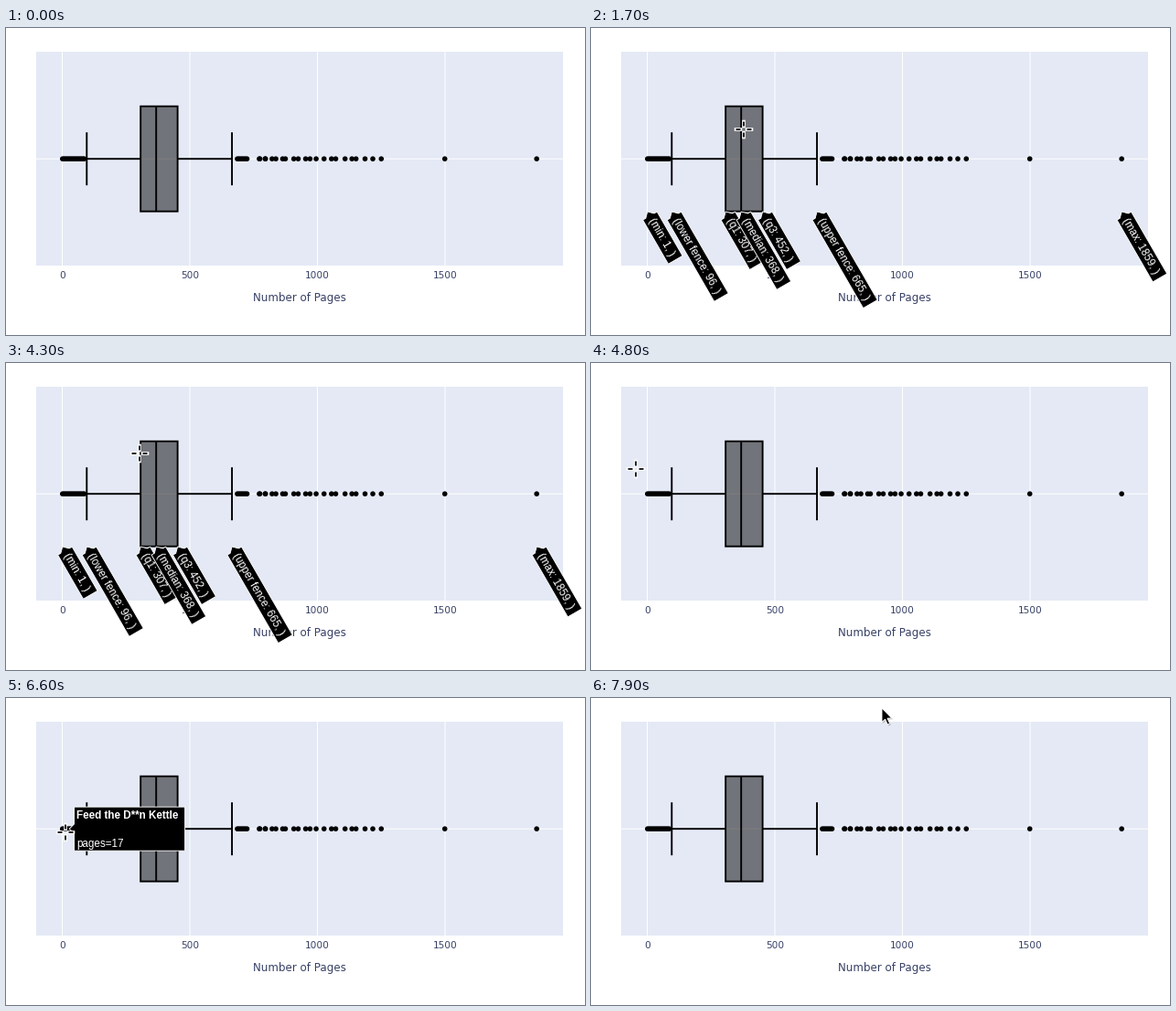
A matplotlib script that plays this animation: 633x336 px, repeating every 8 s.

```python
import numpy as np
import matplotlib.pyplot as plt
from matplotlib.animation import FuncAnimation
from matplotlib.patches import Circle, Polygon, Rectangle

W, H, DPI = 633, 336, 96
PT = 72 / DPI  # points per pixel
INK = "#384167"
MID = 143.2

fig = plt.figure(figsize=(W / DPI, H / DPI), dpi=DPI, facecolor="white")
ax = fig.add_axes([0, 0, 1, 1])
ax.set(xlim=(0, W), ylim=(H, 0))
ax.axis("off")


def px(pages):
    return 61.5 + 0.279 * pages


def line(xs, ys, color, width, z):
    return ax.plot(xs, ys, color=color, lw=width * PT, zorder=z, snap=False,
                   solid_capstyle="butt")[0]


def text(x, y, s, size, color, family="DejaVu Sans", **kw):
    return ax.text(x, y, s, size=size * PT, color=color, family=family,
                   va="baseline", **kw)


# Plot area, grid and axis
ax.add_patch(Rectangle((33, 26), 576, 234, fc="#e4e9f5", lw=0, zorder=0))
for tick in range(0, 2000, 500):
    line([px(tick)] * 2, [26, 260], "white", 1, 1)
    text(px(tick), 274, str(tick), 10.5, INK, ha="center")
line([33, 609], [MID, MID], "white", 1, 1)
text(321, 299, "Number of Pages", 11.85, INK, ha="center")

# Box plot
LOW, Q1, MEDIAN, Q3, HIGH, MAX = 96, 307, 368, 452, 665, 1859
BOX = MID + np.array([-57.5, 57.5])
ax.add_patch(Rectangle((px(Q1), BOX[0]), px(Q3) - px(Q1), np.ptp(BOX),
                       fc=(0, 0, 0, 0.5), ec="black", lw=1.9 * PT,
                       snap=False, zorder=2))
line([px(MEDIAN)] * 2, BOX, "black", 1.9, 3)
for fence, edge in ((LOW, Q1), (HIGH, Q3)):
    line([px(fence), px(edge)], [MID, MID], "black", 1.9, 3)
    line([px(fence)] * 2, MID + np.array([-29, 29]), "black", 1.9, 3)

# Outliers: dense next to the fences, thinning out to the right
rng = np.random.default_rng(4)
tail = 765 + 478 * np.linspace(0, 1, 22) ** 1.3 + rng.uniform(-8, 8, 22)
for pages in [*np.linspace(1, 86, 15), *np.linspace(686, 724, 7), *tail,
              1499, MAX]:
    ax.add_patch(Circle((px(pages), MID), 2.8, fc="black", lw=0, zorder=4))


def callout(x, y, rows, height, z, angle=0):
    """Black hover label with its tip at (x, y); rows are (text, dy, weight)."""
    a = np.radians(angle)
    turn = np.array([[np.cos(a), -np.sin(a)], [np.sin(a), np.cos(a)]])

    def place(u, v):
        return turn @ (u, v) + (x, y)

    texts, width = [], 0
    for s, dy, weight in rows:
        t = text(*place(8, dy), s, 11.6, "white", "Liberation Sans",
                 weight=weight, zorder=z + 0.5, rotation_mode="anchor")
        width = max(width, t.get_window_extent().width)
        t.set_rotation(-angle)
        texts.append(t)
    tip, h, end = 5.3, height / 2, width + 15
    shape = [(0, 0), (tip, tip), (tip, h), (end, h),
             (end, -h), (tip, -h), (tip, -tip)]
    body = Polygon([place(*p) for p in shape], fc="black", ec="white",
                   lw=0.9 * PT, snap=False, zorder=z)
    ax.add_patch(body)
    return [body] + texts


def tooltip(title, pages):
    rows = [(title, -11, "bold"), (f"pages={pages}", 20, "normal")]
    return callout(px(pages) + 3, MID, rows, 48, 30)


stats = {"min": 1, "lower fence": LOW, "q1": Q1, "median": MEDIAN,
         "q3": Q3, "upper fence": HIGH, "max": MAX}
summary = []
for i, (name, value) in enumerate(stats.items()):
    row = (f"({name}: {value}, )", 4.2, "normal")
    summary += callout(px(value), MID + 57.8, [row], 18, 10 + i, angle=60)

# Each group of labels with the frame spans in which it shows
HOVERS = [
    (summary, [(12, 45), (74, 79)]),
    (tooltip("The Inkcarters", 1), [(51, 63)]),
    (tooltip("Feed the D**n Kettle", 1), [(63, 65)]),
    (tooltip("Feed the D**n Kettle", 17), [(65, 74)]),
]

# Crosshair pointer: four arms around a gap, black on a white outline
arms = [np.outer((3.5, 8.5), d) for d in ((1, 0), (-1, 0), (0, 1), (0, -1))]
ARMS = np.vstack([np.vstack([arm, [np.nan] * 2]) for arm in arms])
cross = [line([], [], "white", 3.6, 40), line([], [], "black", 1.7, 41)]
cross[0].set_solid_capstyle("projecting")

# Arrow pointer
ARROW = np.array([(0, 0), (0, 15.5), (3.6, 12.2), (6.2, 18), (8.6, 17),
                  (6, 11.2), (10.8, 11)]) + (318, 11)
arrow = [Polygon(ARROW + 1.3, fc="black", lw=0, alpha=0.25, zorder=40),
         Polygon(ARROW, fc="black", ec="white", lw=0.9 * PT, zorder=41)]
for part in arrow:
    ax.add_patch(part)

# Pointer path: frame, x, y
PATH = np.array([
    (10, 196, 45), (12, 171, 89), (14, 167, 110), (28, 166, 116),
    (32, 169, 123), (34, 169, 140), (37, 173, 188), (40, 173, 188),
    (43, 146, 99), (44, 146, 99), (46, 84, 60), (48, 49, 116),
    (51, 50, 143), (54, 54, 145), (62, 58, 147), (63, 63, 147),
    (66, 65, 147), (73, 65, 147), (75, 165, 110), (77, 262, 43),
])
ENTER, LEAVE = PATH[0, 0], 79


def update(n):
    for group, spans in HOVERS:
        on = any(a <= n < b for a, b in spans)
        for part in group:
            part.set_visible(on)
    spot = [round(np.interp(n, PATH[:, 0], PATH[:, k])) for k in (1, 2)]
    for stroke in cross:
        stroke.set_data(*(ARMS + spot).T)
        stroke.set_visible(ENTER <= n < LEAVE)
    for part in arrow:
        part.set_visible(n >= LEAVE)
    return []


anim = FuncAnimation(fig, update, frames=80, interval=100, repeat=True,
                     init_func=lambda: update(0))
plt.show()
```
